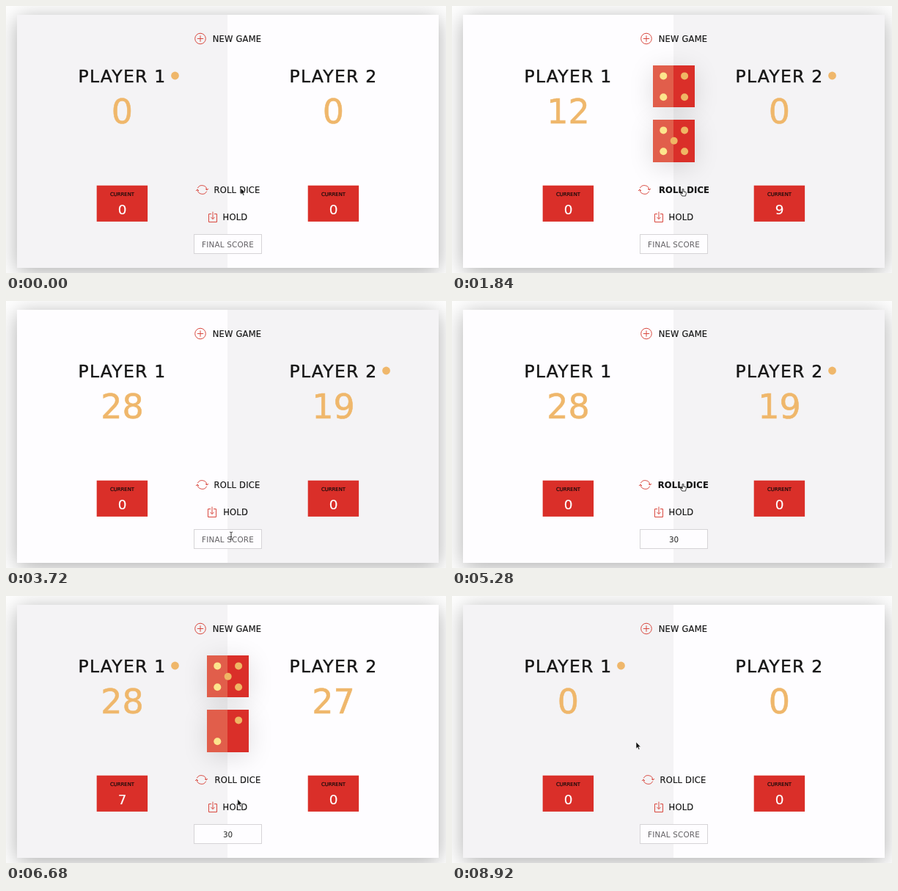
These frames come from a looping animation (600x364 px, 8960 ms). An HTML page:

```html
<!DOCTYPE html>
<html lang="en">
<head>
<meta charset="utf-8">
<title>Dice game</title>
<style>
  html, body { margin: 0; width: 100%; height: 100%; overflow: hidden; background: #fff; }
  body { position: relative; font-family: "DejaVu Sans", sans-serif; color: #161616; }
  svg { display: block; overflow: visible; }
  #board { position: absolute; left: 0; top: 0; width: 600px; height: 364px; }
  #card { position: absolute; left: 14.5px; top: 11.6px; width: 575.5px; height: 345.4px;
    background: #fefdff; box-shadow: 0 5px 28px rgba(0, 0, 0, .32); }
  .panel { position: absolute; top: 0; width: 50%; height: 100%; background: #fefdff; }
  .panel.on { background: #f4f3f5; }
  .panel + .panel { left: 50%; }
  .name { font-size: 23.5px; letter-spacing: 1.25px; fill: #161616; stroke: #161616; stroke-width: .4; }
  .name.won { fill: #e0463f; stroke: #e0463f; }
  .score { font-size: 46px; fill: #efb76b; stroke: #efb76b; stroke-width: .6; }
  .label { font-size: 6.9px; stroke: #161616; stroke-width: .15; }
  .current { font-size: 18.4px; fill: #fff; stroke: #fff; stroke-width: .2; }
  .die { position: absolute; left: 273.5px; width: 57.5px; height: 57.5px;
    background: linear-gradient(90deg, #e15e4b 50%, #da2f29 50%);
    box-shadow: 0 6px 34px rgba(0, 0, 0, .13); }
  .btn { position: absolute; left: 202.5px; width: 200px; height: 20px; display: flex;
    justify-content: center; align-items: center; font-size: 11.5px; letter-spacing: .2px;
    line-height: 20px; white-space: pre; -webkit-text-stroke: .15px #161616; }
  .btn svg { flex: none; position: relative; top: -.8px; left: .4px;
    fill: none; stroke: #d9483f; stroke-width: 1; }
  #field { position: absolute; left: 256px; top: 310.6px; width: 91px; height: 25px;
    border: 1px solid #d6d4d7; background: #fefdff; text-align: center; font-size: 10.4px;
    line-height: 26px; white-space: pre; color: #222; }
  #field.empty { color: #626063; letter-spacing: .2px; }
  #cursor { position: absolute; left: 0; top: 0; }
</style>
</head>
<body>
<div id="board">
  <div id="card"><div class="panel"></div><div class="panel"></div></div>
  <svg id="players" width="600" height="364" style="position:absolute" text-anchor="middle"></svg>
  <div class="die" style="top:80.5px"></div>
  <div class="die" style="top:155px"></div>
  <div class="btn" data-spot="fresh" style="top:35px">
    <svg width="17" height="17"><circle cx="8" cy="8.5" r="7.3"/><path d="M8 4.3v8.4M3.8 8.5h8.4"/></svg>
    <span>NEW GAME</span>
  </div>
  <div class="btn" data-spot="roll" style="top:241px">
    <svg width="17" height="17"><path d="M2.3 6.4A6.7 6.7 0 0 1 15 8.8M14.7 10.6A6.7 6.7 0 0 1 2 8.2M0 10l2-2 2 2M13 7l2 2 2-2"/></svg>
    <span>ROLL DICE</span>
  </div>
  <div class="btn" data-spot="hold" style="top:278px">
    <svg width="12" height="17"><path d="M4 4.5H.5v11h11v-11H8M6 1.5v10M3.3 8.8L6 11.5l2.7-2.7"/></svg>
    <span>HOLD</span>
  </div>
  <div id="field"></div>
  <svg id="cursor" width="1" height="1">
    <path d="M0 0V9.2L2.1 7.3L3.5 10.4L5 9.7L3.6 6.7H6.4Z" fill="#111" stroke="#fff" stroke-width=".6"/>
    <path d="M-.9 .8Q0-.4 .9 .8V4L3.9 4.8Q4.5 5.2 4.3 6.4L3.5 10H-1.2L-3.4 6.8Q-3.4 5.4-2.2 6L-.9 7Z" fill="#fff" stroke="#222" stroke-width=".9"/>
    <path d="M-2-5Q0-5 0-4Q0-5 2-5M0-4V4M-2 5Q0 5 0 4Q0 5 2 5M-1 1.5H1" fill="none" stroke="#333"/>
  </svg>
</div>
<script>
const LOOP = 8960, STEP = 40;
const all = sel => [...document.querySelectorAll(sel)];
const byId = id => document.getElementById(id);

// where the pointer goes for each kind of action
const spots = {
  start: [320, 248], rest: [251, 199], fresh: [310, 46], roll: [315, 249],
  hold: [316, 287], field: [307, 320], edge: [316, 312]
};

// the game as played: time, spot, and dice or text; scores and pointer follow from it
const actions = [
  [0, 'start'],
  [320, 'roll', [5, 3]], [560, 'roll', [2, 2]], [1000, 'hold'],
  [1480, 'roll', [4, 5]], [2000, 'roll', [6, 4]], [2440, 'hold'],
  [2800, 'roll', [5, 3]], [3040, 'roll', [6, 2]], [3360, 'hold'],
  [3800, 'field', ''], [4280, 'field', '3'], [4480, 'field', '30'],
  [5400, 'roll', [5, 3]], [5840, 'hold'],
  [6280, 'roll', [5, 2]], [6880, 'hold'],
  [7600, 'fresh'], [8200, 'edge', ''], [8920, 'rest']
];

const reset = () => ({ turn: 0, scores: [0, 0], current: 0, dice: null, won: false });

const rules = {
  roll(s, dice) {
    s.dice = dice;
    s.current += dice[0] + dice[1];
  },
  hold(s) {
    s.scores[s.turn] += s.current;
    s.current = 0;
    s.dice = null;
    s.won = s.field !== '' && s.scores[s.turn] >= +s.field;
    if (!s.won) s.turn = 1 - s.turn;
  },
  fresh(s) { Object.assign(s, reset()); },
  field(s, text) { s.field = text; },
  edge(s, text) { s.field = text; }
};

function stateAt(t) {
  const s = { ...reset(), field: '' };
  for (const [at, spot, arg] of actions) {
    if (at <= t && rules[spot]) rules[spot](s, arg);
  }
  return s;
}

// Each move ends shortly before its click and takes longer over longer ways.
function pointerAt(t) {
  const next = actions.findIndex(a => a[0] > t);
  if (next < 0) return { x: spots.rest[0], y: spots.rest[1], idle: true };
  const [x0, y0] = spots[actions[next - 1][1]], [x1, y1] = spots[actions[next][1]];
  const time = 200 + Math.hypot(x1 - x0, y1 - y0);
  const u = Math.min(1, Math.max(0, 1 + (t - actions[next][0] + 120) / time));
  const e = u * u * (3 - 2 * u);
  return {
    x: x0 + (x1 - x0) * e,
    y: y0 + (y1 - y0) * e,
    idle: u === 0 || actions[next][1] === actions[next - 1][1]
  };
}

function isOver(spot, t) {
  const p = pointerAt((t + LOOP) % LOOP), [x, y] = spots[spot];
  return Math.abs(p.x - x) < 4 && Math.abs(p.y - y) < 8;
}

// share of the last 320 ms spent over the button: a linear ease in and out
function hoverEase(spot, t) {
  let n = 0;
  for (let i = 0; i < 8; i++) n += isOver(spot, t - i * STEP);
  return n / 8;
}

function playerSvg(i, s) {
  const x = 158.5 + i * 288, mine = s.turn === i, won = mine && s.won;
  const text = (cls, y, str) => `<text class="${cls}" x="${x}" y="${y}">${str}</text>`;
  return text(won ? 'name won' : 'name', 104, won ? 'WINNER!' : 'PLAYER ' + (i + 1)) +
    (mine && !won ? `<circle cx="${x + 72}" cy="95" r="5.4" fill="#efb76b"/>` : '') +
    text('score', 160.2, s.scores[i]) +
    `<rect x="${x - 34.8}" y="244.7" width="69.4" height="49.2" fill="#da2f29"/>` +
    text('label', 258.6, 'CURRENT') +
    text('current', 283.6, mine ? s.current : 0);
}

function pips(n) {
  const places = [];
  if (n % 2) places.push([1, 1]);
  if (n > 1) places.push([0, 2], [2, 0]);
  if (n > 3) places.push([0, 0], [2, 2]);
  if (n > 5) places.push([0, 1], [2, 1]);
  const dots = places.map(([c, r]) =>
    `<circle cx="${14.3 + c * 14.4}" cy="${14.4 + r * 14.4}" r="5" fill="${c ? '#efb664' : '#fce58c'}"/>`);
  return `<svg width="57.5" height="57.5">${dots.join('')}</svg>`;
}

const panels = all('.panel'), dice = all('.die'), buttons = all('.btn');
const players = byId('players'), field = byId('field'), cursor = byId('cursor');

function drawGame(s) {
  panels.forEach((p, i) => p.classList.toggle('on', s.turn === i));
  players.innerHTML = playerSvg(0, s) + playerSvg(1, s);
  dice.forEach((d, i) => {
    d.style.display = s.dice ? 'block' : 'none';
    d.innerHTML = s.dice ? pips(s.dice[i]) : '';
  });
  field.textContent = s.field || 'FINAL SCORE';
  field.classList.toggle('empty', !s.field);
}

function drawPointer(t, s) {
  const p = pointerAt(t);
  let kind = p.y > 310 ? 2 : 0;
  for (const btn of buttons) {
    const spot = btn.dataset.spot, over = isOver(spot, t);
    if (over) kind = 1;
    btn.style.fontWeight = over ? 700 : 400;
    btn.firstElementChild.style.marginRight = 8 + 3 * hoverEase(spot, t) + 'px';
  }
  [...cursor.children].forEach((c, i) => { c.style.display = i === kind ? 'inline' : 'none'; });
  cursor.style.transform = `translate(${p.x}px, ${p.y}px)`;
  // typing hides the pointer until it moves again
  cursor.style.visibility = kind === 2 && s.field && p.idle && p.y === spots.field[1] ? 'hidden' : 'visible';
}

let last = '';
function draw(t) {
  const s = stateAt(t), key = JSON.stringify(s);
  if (key !== last) drawGame(s);
  last = key;
  drawPointer(t, s);
}

const start = performance.now();
function tick() {
  const t = Math.max(0, performance.now() - start) % LOOP;
  draw(Math.floor(t / STEP) * STEP);
  requestAnimationFrame(tick);
}
tick();
</script>
</body>
</html>
```
